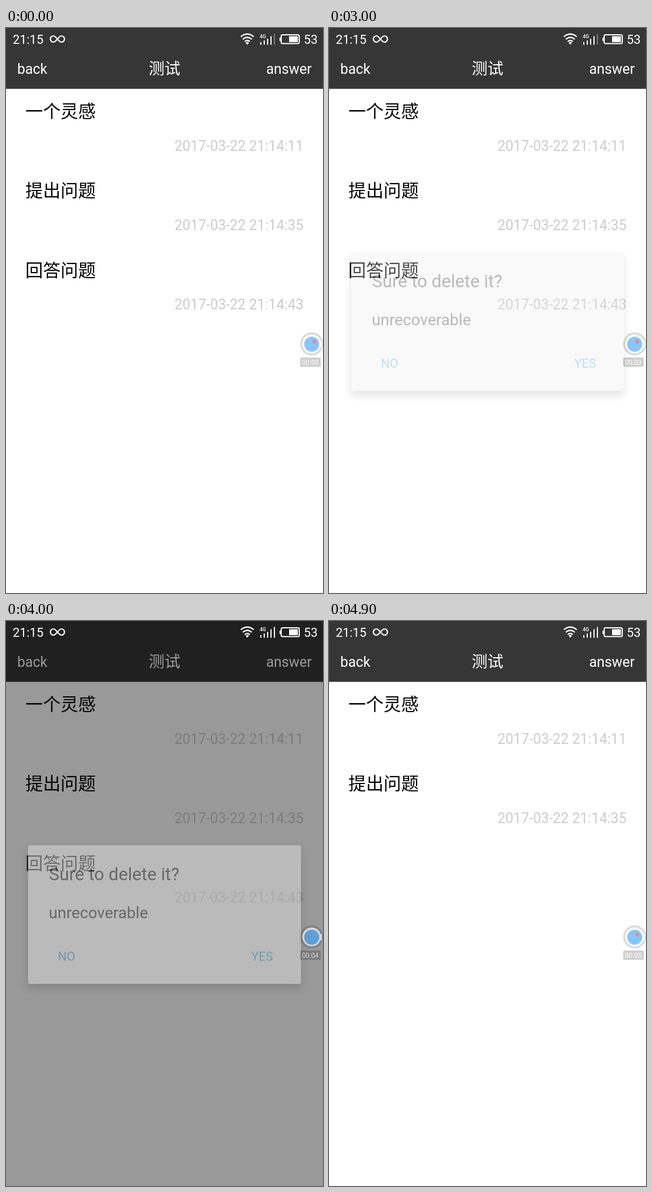
Animation of 561x998 px, one loop 5 s. Source, as an HTML page:

```html
<!DOCTYPE html>
<html lang="zh-CN">
<head>
<meta charset="utf-8">
<style>
  html, body { margin: 0; width: 100%; height: 100%; overflow: hidden; background: #fff; }
  svg { display: block; width: 561px; height: 998px; }
  text { font: 24.94px Roboto, sans-serif; white-space: pre; }
  .cjk { font: 350 31.17px "Noto Sans CJK SC", "Noto Sans CJK", sans-serif; }
  .title { font-size: 28.05px; }
  .date { fill: #ccc; text-anchor: end; }
  .small { font-size: 21.82px; }
  .line { fill: none; stroke: #fff; stroke-width: 2.2; }
  #dialog { filter: drop-shadow(0 8px 8px rgba(0, 0, 0, .36)); }
</style>
</head>
<body>
<svg viewBox="0 0 561 998">
  <rect width="561" height="998" fill="#fff"/>
  <rect width="561" height="107.5" fill="#363636"/>
  <g fill="#fff">
    <text x="20" y="81">back</text>
    <text class="cjk title" x="280.5" y="81.5" text-anchor="middle">测试</text>
    <text x="541" y="81" text-anchor="end">answer</text>
  </g>
  <g id="rows"></g>
  <rect id="dim" width="561" height="998"/>

  <g id="dialog">
    <rect x="39" y="396" width="483" height="245" rx="3" fill="#ececec"/>
    <g fill="#1f1f1f">
      <text x="76" y="457.5" style="font-size:31.17px">Sure to delete it?</text>
      <text x="75.800" y="524.5" style="font-size:28.05px">unrecoverable</text>
    </g>
    <g fill="#349bdb">
      <text class="small" x="92" y="599.5">NO</text>
      <text class="small" x="434" y="599.5">YES</text>
    </g>
  </g>

  <!-- status bar -->
  <g fill="#fff">
    <text class="small" x="12" y="27.5">21:15</text>
    <path class="line" d="M91 19.500C88 16 86.500 14 84 14a5.500 5.500 0 0 0 0 11c2.500 0 4-2 7-5.500s4.500-5.500 7-5.500a5.500 5.500 0 0 1 0 11c-2.500 0-4-2-7-5.500"/>
    <path class="line" d="M415.500 15.500Q427 6 438.500 15.500M419 20Q427 13 435 20M422.500 24Q427 20 431.500 24"/>
    <path d="M424 26Q427 23.500 430 26L427 29.500Z"/>
    <text x="449" y="17.500" style="font-size:9px;font-weight:500">4G</text>
    <path d="M450 25h2v4.500h-2zM456 22h2v7.500h-2zM462 19h2v10.500h-2zM468 14.500h2v15h-2z"/>
    <rect id="bar" x="474" y="10.500" width="2" height="19"/>
    <rect class="line" style="stroke-width:2" x="487" y="12" width="32" height="15.500" rx="2.500"/>
    <path d="M484 17h2v6h-2zM501 14.500h15.500v10.500h-15.500z"/>
    <text class="small" x="527" y="27.5">53</text>
  </g>

  <!-- floating recorder -->
  <g opacity=".62">
    <circle cx="541" cy="558" r="18.5" fill="none" stroke="#000" stroke-opacity=".23" stroke-width="4"/>
    <circle cx="541" cy="558" r="16.600" fill="#fff"/>
    <path d="M553 556L559 552V565L553 561Z" fill="#fff"/>
    <circle cx="541" cy="558.500" r="13.300" fill="#39a6ff"/>
    <circle id="dot" cx="545.500" cy="554" r="3.500" fill="#ee3a3a"/>
    <rect x="520.500" y="582" width="36.500" height="16.500" rx="2.500" fill-opacity=".3"/>
    <text id="timer" x="538.500" y="594.500" text-anchor="middle" fill="#fff" style="font-size:11.900px"></text>
  </g>
</svg>
<script>
const $ = id => document.getElementById(id);

$('rows').innerHTML = [['一个灵感', 11], ['提出问题', 35], ['回答问题', 43]].map(([name, sec], i) =>
  `<g><text class="cjk" x="34.300" y="${158.2 + i * 140.2}">${name}</text>
   <text class="date" x="526.500" y="${217 + i * 140.2}">2017-03-22 21:14:${sec}</text></g>`).join('');
const lastRow = $('rows').lastElementChild;

// Each key is [start time, value]; values are held until the next key.
const held = (t, keys) => keys.reduce((v, [start, next]) => t >= start ? next : v, 0);

const dimKeys = [[3100, .41], [3200, .6], [4000, .4], [4100, .165], [4200, 0]];
const dialogKeys = [[3000, .31], [3100, 1], [4000, .4], [4100, 0]];
const rowKeys = [[0, 1], [4000, .85], [4100, .42], [4200, 0]];

function draw(now) {
  const t = Math.floor(now % 5000 / 100) * 100;
  $('dim').setAttribute('opacity', held(t, dimKeys));
  $('dialog').setAttribute('opacity', held(t, dialogKeys));
  lastRow.setAttribute('opacity', held(t, rowKeys));
  $('bar').setAttribute('opacity', t < 3700 ? .35 : 1);
  $('dot').setAttribute('opacity', (t + 200) % 2400 < 1200 ? 1 : 0);
  $('timer').textContent = '00:0' + Math.floor((t + 100) / 1000);
}

const begin = performance.now();
(function loop() {
  draw(performance.now() - begin);
  requestAnimationFrame(loop);
})();
</script>
</body>
</html>
```
